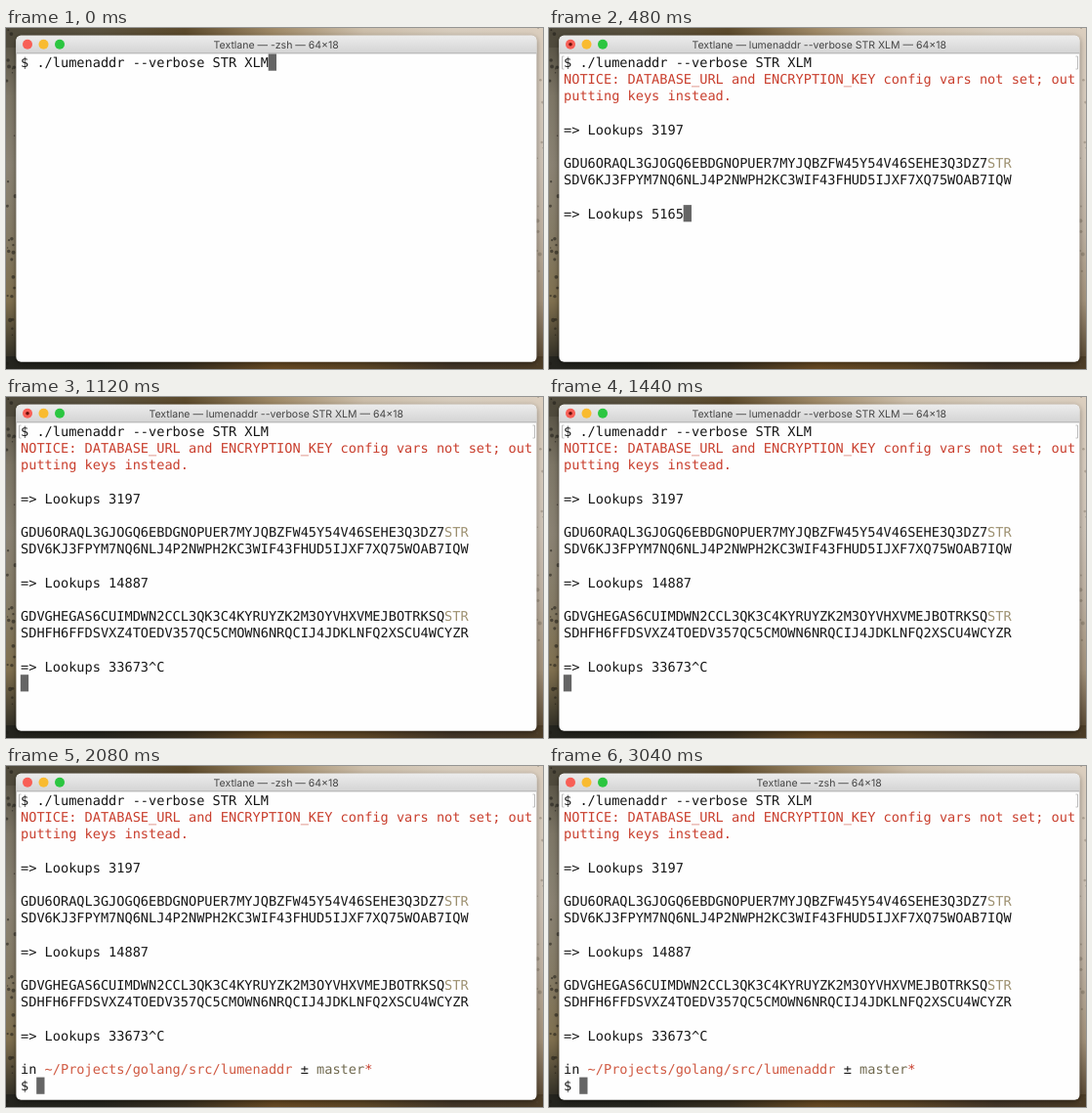
Recreate the animation shown at these times as an HTML page with a canvas. Size 550 px wide and 349 px high, loop 3.12 s.

```html
<!DOCTYPE html>
<html lang="en">
<head>
<meta charset="utf-8">
<title>lumenaddr</title>
<style>
  html, body { margin: 0; width: 100%; height: 100%; overflow: hidden; background: #5c5444; }
  canvas { display: block; }
</style>
</head>
<body>
<canvas id="stage" width="550" height="349"></canvas>
<script>
const W = 550, H = 349, LOOP = 3120, STEP = 80;
const ctx = document.getElementById('stage').getContext('2d');

const WIN = { x: 10.4, y: 7.8, w: 533, h: 334, r: 5, bar: 18.5 };
const COL = 8.19, ROW = 17.18, LEFT = 15, BASE = 40;
const INK = '#161616', RED = '#c93f2e', PATH = '#d05a43', TAN = '#9d9070', OLIVE = '#716a50';

// Moments in ms
const RUN = 400, FIRST = 480, SECOND = 720, STOP = 1040, PROMPT = 1600, BLINK = 560;
const TOTAL = 33673;

const KEYS = [
  'GDU6ORAQL3GJOGQ6EBDGNOPUER7MYJQBZFW45Y54V46SEHE3Q3DZ7',
  'SDV6KJ3FPYM7NQ6NLJ4P2NWPH2KC3WIF43FHUD5IJXF7XQ75WOAB7IQW',
  'GDVGHEGAS6CUIMDWN2CCL3QK3C4KYRUYZK2M3OYVHXVMEJBOTRKSQ',
  'SDHFH6FFDSVXZ4TOEDV357QC5CMOWN6NRQCIJ4JDKLNFQ2XSCU4WCYZR'
];

function gradient(x0, y0, x1, y1, ...colors) {
  const g = ctx.createLinearGradient(x0, y0, x1, y1);
  colors.forEach((c, i) => g.addColorStop(i / (colors.length - 1), c));
  return g;
}

function fill(x, y, w, h, color) {
  ctx.fillStyle = color;
  ctx.fillRect(x, y, w, h);
}

function disc(x, y, r, color) {
  ctx.fillStyle = color;
  ctx.beginPath();
  ctx.arc(x, y, r, 0, Math.PI * 2);
  ctx.fill();
}

function panel(x, y, w, h, r) {
  ctx.beginPath();
  ctx.roundRect(x, y, w, h, r);
}

function random(seed) {
  return () => (seed = (seed * 16807) % 2147483647) / 2147483647;
}

// Blurred photo tones around the window
function drawBackdrop() {
  fill(0, 0, 30, H, gradient(0, 0, 0, H, '#4f4a3c', '#7d7666', '#8b8373', '#857b66', '#80704f', '#24241e'));
  fill(520, 0, 30, H, gradient(0, 0, 0, H, '#dccfbf', '#d9cdbf', '#cfc4b7', '#bfb2a2', '#a3927b', '#4d3d27'));
  fill(0, 0, W, 20, gradient(0, 0, W, 0, '#4f4a3c', '#5a523f', '#5c4a2c', '#a08a68', '#cdbfab', '#d8cdbe', '#dccfbf'));
  fill(0, 336, W, 13, gradient(0, 0, W, 0, '#24241e', '#26261f', '#3b3222', '#6a4c24', '#5f4827', '#45382a', '#4d3d27'));
  const rnd = random(77);
  for (let i = 0; i < 44; i++) {
    const y = rnd() * H, r = 0.7 + rnd() * 1.5;
    if (i % 3) disc(rnd() * 10, y, r, 'rgba(30,28,22,.55)');
    else disc(544 + rnd() * 6, y, r, 'rgba(90,78,62,.3)');
  }
}

function drawWindow(title, busy) {
  const { x, y, w, h, r, bar } = WIN;
  ctx.save();
  ctx.shadowColor = 'rgba(0,0,0,.4)';
  ctx.shadowBlur = 7;
  ctx.shadowOffsetY = 2;
  ctx.fillStyle = '#fefefe';
  panel(x, y, w, h, r);
  ctx.fill();
  ctx.restore();

  ctx.fillStyle = gradient(0, y, 0, y + bar, '#ececec', '#d3d3d3');
  panel(x, y, w, bar, [r, r, 0, 0]);
  ctx.fill();
  fill(x, y + bar - 1, w, 1, '#b4b4b4');

  ['#f85f56', '#f9bb30', '#2bc640'].forEach((c, i) => disc(22 + i * 16.5, 16.8, 5, c));
  if (busy) disc(22, 16.8, 1.8, '#6b100c');

  ctx.font = '10.5px Inter, "Open Sans", sans-serif';
  ctx.textAlign = 'center';
  ctx.fillStyle = '#444';
  ctx.fillText(`Textlane — ${title} — 64×18`, 276.7, 20.6);
}

// Writes text on the character grid and returns the next column
function put(row, col, text, color = INK) {
  ctx.fillStyle = color;
  for (const ch of text) ctx.fillText(ch, LEFT + COL * col++, BASE + ROW * row);
  return col;
}

function cursor(row, col) {
  fill(LEFT + COL * col - 0.2, 26.5 + ROW * row, 8.3, 17.2, '#656565');
}

function bracket(x, dir) {
  ctx.strokeStyle = '#bdbdbd';
  ctx.lineWidth = 1;
  ctx.beginPath();
  ctx.moveTo(x + 2 * dir, 29);
  ctx.lineTo(x, 29);
  ctx.lineTo(x, 42);
  ctx.lineTo(x + 2 * dir, 42);
  ctx.stroke();
}

const lookups = (row, n) => put(row, 0, `=> Lookups ${n}`);

function keyPair(row, i) {
  put(row, put(row, 0, KEYS[i]), 'STR', TAN);
  put(row + 1, 0, KEYS[i + 1]);
}

function drawPrompt(t) {
  let col = put(16, 0, 'in ');
  col = put(16, col, '~/Projects/golang/src/lumenaddr', PATH);
  col = put(16, col, ' ± ');
  col = put(16, col, 'master', OLIVE);
  put(16, col, '*', RED);
  put(17, 0, '$');
  if (Math.floor((t - PROMPT) / BLINK) % 2 === 0) cursor(17, 2);
}

function drawOutput(t) {
  const end = put(0, 0, '$ ./lumenaddr --verbose STR XLM');
  if (t < RUN) return cursor(0, end);

  bracket(13.5, 1);
  bracket(541.5, -1);
  put(1, 0, 'NOTICE: DATABASE_URL and ENCRYPTION_KEY config vars not set; out', RED);
  put(2, 0, 'putting keys instead.', RED);

  let row = 4;
  if (t >= FIRST) {
    lookups(4, 3197);
    keyPair(6, 0);
    row = 9;
  }
  if (t >= SECOND) {
    lookups(9, 14887);
    keyPair(11, 2);
    row = 14;
  }
  const count = Math.min(TOTAL, Math.floor(5165 + (t - FIRST) * 52.8125));
  const col = lookups(row, count);
  if (t < STOP) return cursor(row, col);

  put(row, col, '^C');
  if (t < PROMPT) cursor(15, 0);
  else drawPrompt(t);
}

function draw(now) {
  const t = Math.floor((now % LOOP) / STEP) * STEP;
  const busy = t >= RUN && t < PROMPT;
  ctx.textRendering = 'geometricPrecision';
  drawBackdrop();
  drawWindow(busy ? 'lumenaddr --verbose STR XLM' : '-zsh', busy);
  ctx.font = '13.6px "DejaVu Sans Mono", monospace';
  ctx.textAlign = 'left';
  drawOutput(t);
}

const start = performance.now();
function tick() {
  draw(performance.now() - start);
  requestAnimationFrame(tick);
}
tick();
</script>
</body>
</html>
```
